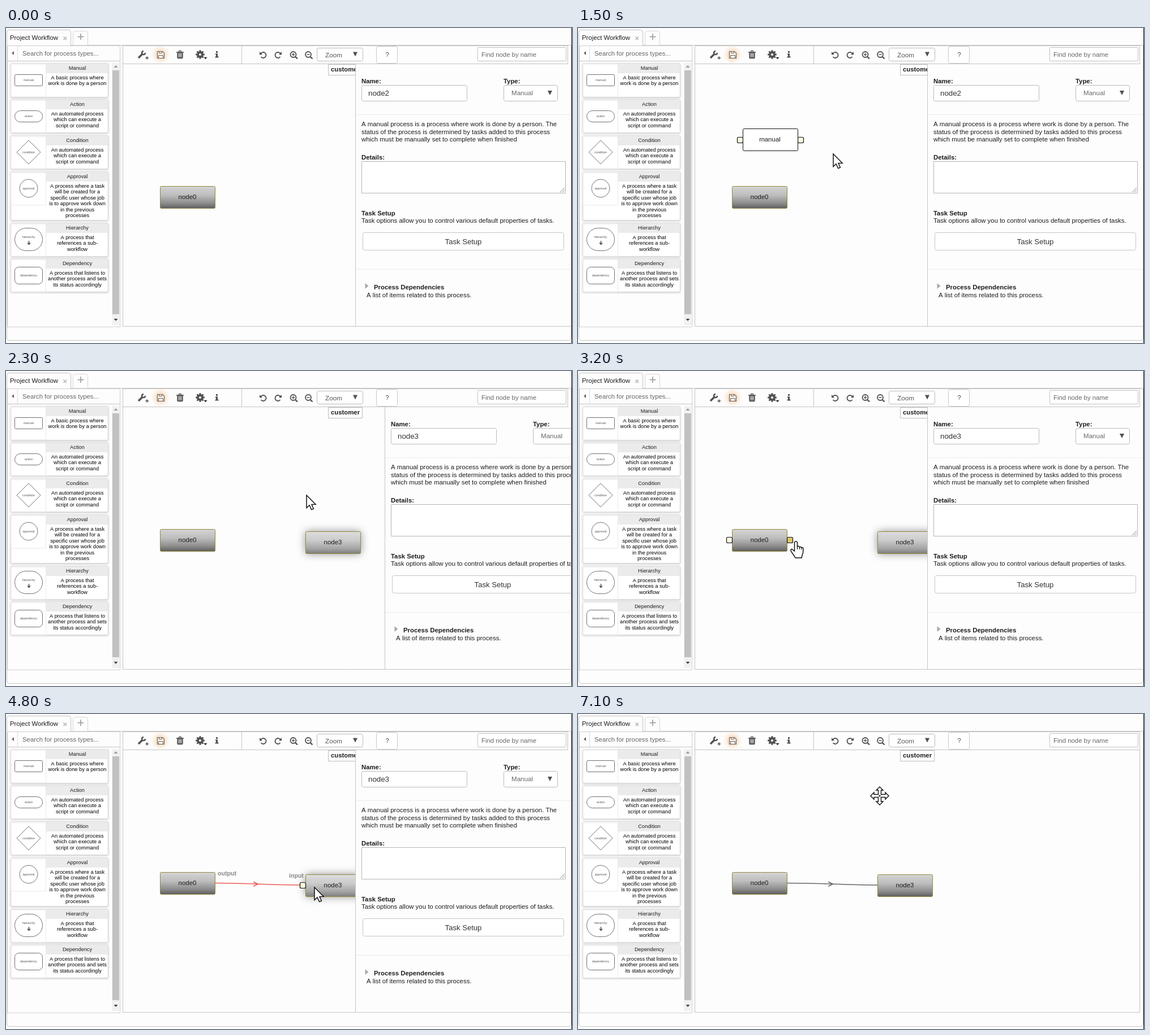
An HTML page with a canvas for the animation above (7200 ms loop, 1000 by 558 pixels).

```html
<!DOCTYPE html>
<html lang="en">
<head>
<meta charset="utf-8">
<title>Workflow editor</title>
<style>
html, body { margin: 0; width: 100%; height: 100%; overflow: hidden; background: #fdfdfd; }
canvas { display: block; width: 1000px; height: 558px; }
</style>
</head>
<body>
<canvas id="stage" width="1000" height="558"></canvas>
<script>
const ctx = document.getElementById('stage').getContext('2d');
const LOOP = 7200, STEP = 100, SLIDE = 400;
const SLIDE_IN = 1996, SLIDE_OUT = 5328;
const BG = '#fdfdfd', LINE = '#c4c4c4', INK = '#1c1c1c', ICON = '#505050';
const OPEN_X = 618, TRAVEL = 382;

function text(str, x, y, size = 11.4, { bold = false, color = INK, align = 'left' } = {}) {
  ctx.font = `${bold ? 'bold ' : ''}${size}px "Liberation Sans", Arial, sans-serif`;
  ctx.textAlign = align;
  ctx.fillStyle = color;
  ctx.fillText(str, x, Math.round(y + size * 0.36));
}

function box(x, y, w, h, r = 0, stroke = LINE, fill = null, width = 1) {
  ctx.beginPath();
  ctx.roundRect(x + 0.5, y + 0.5, w, h, r);
  if (fill) { ctx.fillStyle = fill; ctx.fill(); }
  if (stroke) { ctx.strokeStyle = stroke; ctx.lineWidth = width; ctx.stroke(); }
}

function rect(x, y, w, h, color) {
  ctx.fillStyle = color;
  ctx.fillRect(x, y, w, h);
}

function trace(points, close) {
  ctx.beginPath();
  points.forEach(([x, y]) => ctx.lineTo(x, y));
  if (close) ctx.closePath();
}

function poly(points, fill, stroke, width = 1) {
  trace(points, true);
  if (fill) { ctx.fillStyle = fill; ctx.fill(); }
  if (stroke) { ctx.strokeStyle = stroke; ctx.lineWidth = width; ctx.stroke(); }
}

function line(points, color = ICON, width = 1) {
  trace(points, false);
  ctx.strokeStyle = color;
  ctx.lineWidth = width;
  ctx.stroke();
}

function ring(x, y, r, color = ICON, width = 1, from = 0, to = Math.PI * 2) {
  ctx.beginPath();
  ctx.arc(x, y, r, from, to);
  ctx.strokeStyle = color;
  ctx.lineWidth = width;
  ctx.stroke();
}

function at(x, y, draw, flip = 1) {
  ctx.save();
  ctx.translate(x, y);
  ctx.scale(flip, 1);
  draw();
  ctx.restore();
}

const caret = (x, y, w, h, color = ICON) =>
  poly([[x - w, y - h], [x + w, y - h], [x, y + h]], color);

// Sidebar
const tiles = [
  { name: 'Manual', y: 62, h: 60, lines: ['A basic process where', 'work is done by a person'] },
  { name: 'Action', y: 126, h: 59, lines: ['An automated process', 'which can execute a', 'script or command'] },
  { name: 'Condition', y: 190, h: 59, lines: ['An automated process', 'which can execute a', 'script or command'] },
  { name: 'Approval', y: 254, h: 86, lines: ['A process where a task', 'will be created for a', 'specific user whose job', 'is to approve work down', 'in the previous', 'processes'] },
  { name: 'Hierarchy', y: 345, h: 59, lines: ['A process that', 'references a sub-', 'workflow'] },
  { name: 'Dependency', y: 408, h: 59, lines: ['A process that listens to', 'another process and sets', 'its status accordingly'] }
];

const shapes = {
  Manual: y => box(15, y - 10, 49, 20, 2, '#707070', '#fff'),
  Action: y => box(15, y - 10, 49, 20, 10, '#707070', '#fff'),
  Condition: y => poly([[40, y - 21], [61, y], [40, y + 21], [19, y]], '#fff', '#777'),
  Approval: y => ring(40, y, 16, '#777'),
  Hierarchy: y => {
    box(15, y - 21, 49, 40, 20, '#707070', '#fff');
    line([[40.5, y + 2], [40.5, y + 8]], '#444', 1.3);
    line([[38, y + 5.5], [40.5, y + 8.5], [43, y + 5.5]], '#444', 1.3);
  },
  Dependency: y => box(15, y - 15, 49, 30, 7, '#707070', '#fff')
};

function tile({ name, y, h, lines }) {
  ctx.save();
  ctx.shadowColor = 'rgba(0,0,0,.18)';
  ctx.shadowBlur = 3;
  ctx.shadowOffsetY = 1;
  box(8, y, 172, h, 2, '#dedede', '#fff');
  ctx.restore();
  rect(71, y + 1, 109, 17, '#ebebeb');
  box(8, y + 0.5, 62, 59, 0, '#e9e9e9');
  const mid = y + 30;
  shapes[name](mid);
  text(name.toLowerCase(), 40, name === 'Hierarchy' ? mid - 5 : mid, 5.5, { align: 'center', color: '#555' });
  text(name, 126, y + 8.6, 9.3, { align: 'center' });
  lines.forEach((s, i) => text(s, 126, y + 25.7 + i * 10.4, 9.25, { align: 'center', color: '#000' }));
}

function sidebar() {
  box(2, 31, 199, 498, 0, '#d0d0d0');
  line([[20.5, 32], [20.5, 58]], '#dadada');
  line([[2, 58.5], [202, 58.5]], LINE);
  poly([[14, 41], [14, 48], [10, 44.5]], '#666');
  text('Search for process types...', 29, 44.5, 11.35, { color: '#666' });
  rect(187, 62, 13, 464, '#f1f1f1');
  rect(188, 75, 12, 432, '#c1c1c1');
  poly([[190.5, 70], [197.5, 70], [194, 66]], '#999');
  poly([[190.5, 515], [197.5, 515], [194, 519]], '#444');
  tiles.forEach(tile);
}

// Toolbar
function turnArrow(x, flip) {
  at(x, 48, () => {
    ring(0, 0, 5, ICON, 1.8, -2.6, 2.5);
    poly([[-6.5, -6], [-6.5, -0.8], [-1.5, -0.8]], ICON);
  }, flip);
}

function lens(x, plus) {
  at(x, 47, () => {
    ring(0, 0, 5, ICON, 1.8);
    line([[3.6, 3.8], [7.5, 7.5]], ICON, 2.4);
    line([[-2.6, 0], [2.6, 0]], ICON, 1.4);
    if (plus) line([[0, -2.6], [0, 2.6]], ICON, 1.4);
  });
}

function toolbar() {
  line([[207, 63.5], [992, 63.5]], LINE);
  line([[416.5, 32], [416.5, 63]], LINE);

  at(240, 47, () => {
    line([[-6, 6], [1, -1]], ICON, 3.4);
    ring(3, -3, 3, ICON, 2.6, 0, 4.7);
    line([[6.5, 6], [12, 6]], ICON, 1.5);
    line([[9.2, 3.2], [9.2, 8.8]], ICON, 1.5);
  });

  const glow = ctx.createRadialGradient(273, 47, 8, 273, 47, 17);
  glow.addColorStop(0, '#fbe3cc');
  glow.addColorStop(1, 'rgba(253,236,220,0)');
  rect(256, 32, 34, 31, glow);
  poly([[267.5, 41.5], [276.5, 41.5], [279.5, 44.5], [279.5, 53.5], [267.5, 53.5]], '#fdf3e8', '#6a625c', 1.2);
  box(270, 41, 5, 3, 0, '#6a625c');
  box(269, 48, 8, 5, 0, '#6a625c');

  box(302.5, 43, 9, 10, 1, ICON, '#777', 1.4);
  line([[301, 43], [314, 43]], ICON, 1.6);
  line([[305, 42], [306, 40.5], [309, 40.5], [310, 42]], ICON, 1.3);
  [305.5, 307.5, 309.5].forEach(x => line([[x, 45], [x, 51]], '#eee', 0.8));

  ring(343, 47, 4, ICON, 3.8);
  for (let i = 0; i < 8; i++) {
    const a = i * Math.PI / 4, c = Math.cos(a), s = Math.sin(a);
    line([[343 + c * 5, 47 + s * 5], [343 + c * 7.8, 47 + s * 7.8]], ICON, 3);
  }
  caret(352.5, 53.5, 3, 1.8, '#222');

  rect(371, 41, 3, 3, ICON);
  rect(370, 45.5, 4, 2, ICON);
  rect(371, 45.5, 3, 6, ICON);
  rect(369.5, 50.5, 6, 2, ICON);

  turnArrow(454.5, 1);
  turnArrow(480.5, -1);
  lens(507.5, true);
  lens(534, false);

  box(549, 35, 81, 23, 3, '#bbb', '#fff');
  text('Zoom', 564, 47.5, 11.7, { color: '#555' });
  caret(617, 46.5, 4, 4);
  box(654, 32, 37, 30, 3, '#c8c8c8', '#fff');
  text('?', 673.5, 47, 11.5, { align: 'center', color: '#444' });
  box(833, 34, 156, 24, 1, '#c0c0c0', '#fff');
  text('Find node by name', 840, 46.5, 11.35, { color: '#666' });
}

function shell() {
  rect(0, 0, 1000, 558, BG);
  box(1, 30, 997, 523, [0, 0, 5, 5], LINE);
  rect(999, 0, 1, 558, '#111');
  box(118, 5, 26, 25, [4, 4, 0, 0], '#d6d6d6', BG);
  line([[126.5, 15.5], [137.5, 15.5]], '#999', 1.6);
  line([[132, 10], [132, 21]], '#999', 1.6);
  box(1, 3, 113, 28, [4, 4, 0, 0], LINE, BG);
  rect(2, 30, 112, 2, BG);
  text('Project Workflow', 7, 17, 11.35);
  line([[101.5, 15.5], [107, 21]], '#c3b4b4', 1.7);
  line([[107, 15.5], [101.5, 21]], '#c3b4b4', 1.7);
  sidebar();
  box(206, 31, 786, 497, 0, LINE);
  toolbar();
  box(569, 64, 60, 19, 0, '#bbb', '#fff');
  text('customer', 574, 73, 11.35, { bold: true });
}

// Graph
function port(x, y, hot) {
  box(x, y, 10, 10, 2, '#111', hot ? '#e9d67a' : '#fffbe0', 1.2);
  if (hot) for (let i = 2; i < 9; i += 3) for (let j = 2; j < 9; j += 3) rect(x + i, y + j, 1, 1, '#6b5a14');
}

function node(label, x, y, selected) {
  const fill = ctx.createLinearGradient(0, y, 0, y + 40);
  const tones = selected ? ['#dedede', '#cbcbcb', '#a6a6a6', '#7c7c7c'] : ['#d6d6d6', '#bdbdbd', '#8e8e8e', '#5c5c5c'];
  tones.forEach((tone, i) => fill.addColorStop([0, 0.4, 0.75, 1][i], tone));
  ctx.save();
  if (selected) { ctx.shadowColor = 'rgba(0,0,0,.45)'; ctx.shadowBlur = 15; }
  box(x, y, 97, 39, 2, null, fill);
  ctx.restore();
  box(x, y, 97, 39, 2, '#93883c');
  text(label, x + 48.5, y + 19, 11.5, { align: 'center' });
}

function rawNode(cx, cy) {
  const x = Math.round(cx - 49), y = Math.round(cy - 19);
  if (x > 207) {
    port(x - 10, y + 15);
    port(x + 97, y + 15);
  }
  box(x, y, 97, 39, 2, '#111', '#fff');
  text('manual', cx - 1, cy, 11.5, { align: 'center' });
}

function link(x, y, color) {
  const dx = x - 370;
  ctx.beginPath();
  ctx.moveTo(370, 299.5);
  ctx.bezierCurveTo(370 + dx * 0.4, 299.8, x - dx * 0.4, y - 0.5, x, y);
  ctx.strokeStyle = color;
  ctx.lineWidth = 1.6;
  ctx.stroke();
  const tip = 370 + dx * 0.505, my = (299.5 + y) / 2;
  if (dx > 30) line([[tip - 8, my - 4], [tip, my], [tip - 8, my + 4]], color, 1.6);
}

// Properties
function panel(x, name) {
  if (x >= 998) return;
  ctx.save();
  ctx.beginPath();
  ctx.rect(0, 64, 998, 465);
  ctx.clip();
  rect(x, 64, 400, 464, BG);
  line([[x, 528.5], [998, 528.5]], LINE);
  ctx.translate(x, 0);
  line([[-0.5, 64], [-0.5, 528]], LINE);
  const bold = { bold: true };
  text('Name:', 10, 94, 11.35, bold);
  box(10, 101, 186, 28, 3, '#bbb', '#fff');
  text(name, 22, 115, 13.3, { color: '#333' });
  text('Type:', 261, 94, 11.35, bold);
  box(261, 101, 95, 28, 3, '#bbb', '#fff');
  text('Manual', 275, 115, 11.6, { color: '#666' });
  caret(343, 115, 4, 4);
  line([[0, 153.5], [380, 153.5]], '#ececec');
  ['A manual process is a process where work is done by a person. The',
    'status of the process is determined by tasks added to this process',
    'which must be manually set to complete when finished'
  ].forEach((s, i) => text(s, 10, 170 + i * 13.4));
  text('Details:', 10, 229.3, 11.35, bold);
  box(10, 236, 360, 56, 0, '#b5b5b5', '#fff');
  line([[361, 291], [369, 283]], '#888');
  line([[365, 291], [369, 287]], '#888');
  text('Task Setup', 10, 328, 11.35, bold);
  text('Task options allow you to control various default properties of tasks.', 10, 341.3);
  box(12, 362, 355, 31, 3, '#c4c4c4', '#fff');
  text('Task Setup', 190, 378, 13.1, { align: 'center', color: '#333' });
  line([[0, 427.5], [380, 427.5]], '#ececec');
  poly([[16.5, 452], [16.5, 462], [22.5, 457]], '#aaa');
  text('Process Dependencies', 32, 459.4, 11.35, bold);
  text('A list of items related to this process.', 19, 473);
  ctx.restore();
}

// Pointer
const track = [
  [400, 300, 215], [800, 42, 94], [1130, 42, 94], [1400, 340, 197],
  [1500, 451, 223], [1800, 578, 303], [1950, 578, 303], [2300, 531, 220],
  [2500, 531, 220], [3100, 385, 301], [3600, 385, 301], [4550, 545, 307],
  [4850, 545, 307], [5200, 517, 129]
];

function along(t) {
  const i = track.findIndex(k => k[0] > t);
  if (i < 0) return track[track.length - 1].slice(1);
  if (i === 0) return track[0].slice(1);
  const [a, b] = [track[i - 1], track[i]];
  const p = (t - a[0]) / (b[0] - a[0]);
  return [a[1] + (b[1] - a[1]) * p, a[2] + (b[2] - a[2]) * p];
}

const arrow = () => poly([[0, 0], [0, 22.5], [5, 17.8], [8.6, 25.6], [12.4, 24], [9, 16.5], [16, 16.3]], '#fff', '#111', 1.5);

function hand() {
  ctx.beginPath();
  ctx.moveTo(-2.5, 18);
  ctx.lineTo(-2.5, 2.5);
  ctx.quadraticCurveTo(0, -1, 2.5, 2.5);
  ctx.lineTo(2.5, 10);
  ctx.quadraticCurveTo(5, 8, 6.5, 11);
  ctx.quadraticCurveTo(9, 9.5, 10, 12);
  ctx.quadraticCurveTo(13, 11, 13, 14);
  ctx.lineTo(12.5, 21);
  ctx.quadraticCurveTo(11, 25, 10, 30);
  ctx.lineTo(-1, 30);
  ctx.quadraticCurveTo(-3, 26, -7.5, 20);
  ctx.quadraticCurveTo(-11, 14.5, -7, 14.5);
  ctx.closePath();
  ctx.fillStyle = '#fff';
  ctx.fill();
  ctx.strokeStyle = '#111';
  ctx.lineWidth = 1.5;
  ctx.stroke();
  line([[2.5, 10], [2.5, 15]], '#111', 1.2);
  line([[6.5, 11], [6.5, 15]], '#111', 1.2);
  line([[10, 12], [10, 15.5]], '#111', 1.2);
}

function mover() {
  const arm = [[-2.5, -2.5], [-2.5, -10], [-6, -10], [0, -16], [6, -10], [2.5, -10]];
  const points = [];
  for (let q = 0; q < 4; q++) {
    const c = [1, 0, -1, 0][q], s = [0, 1, 0, -1][q];
    arm.forEach(([x, y]) => points.push([x * c - y * s, x * s + y * c]));
  }
  poly(points, '#fff', '#111', 1.4);
  line([[-2, 0], [2, 0]], '#111');
  line([[0, -2], [0, 2]], '#111');
}

function pointer(t) {
  if (t < 400) return;
  const [x, y] = along(t);
  if (t >= 6000) at(x + 16, y + 16, mover);
  else at(x, y, t >= 3000 && t < 3600 ? hand : arrow);
}

const swing = p => 0.5 - Math.cos(Math.PI * Math.min(1, Math.max(0, p))) / 2;

function panelX(t) {
  if (t < SLIDE_IN) return OPEN_X;
  const hidden = 1 - swing((t - SLIDE_IN) / SLIDE) + swing((t - SLIDE_OUT) / SLIDE);
  return Math.round(OPEN_X + TRAVEL * hidden);
}

function draw(t) {
  shell();
  const placed = t >= 2000, linked = t >= 4600, active = t < 5300;

  if (t >= 3600) {
    const p = Math.min(1, (t - 3600) / 950);
    if (active) link(380 + 139 * p, 300 + 3 * p, '#ee5c55');
    else link(529, 303, '#666');
  }
  node('node0', 272, 280);
  if (placed) node('node3', 529, 284, active);
  if (t >= 1130 && !placed) rawNode(...along(t - 100));
  if (t >= 2900 && t < 3900) {
    port(262, 294);
    port(369, 294, t >= 3000);
  }
  if (t >= 3600 && active) text('output', 374, 282, 10.6, { bold: true, color: '#888' });
  if (t >= 4300 && t < 5000) port(519, 298);
  if (linked && active) text('input', 500, 286, 10.6, { bold: true, color: '#888' });

  panel(panelX(t), placed ? 'node3' : 'node2');
  pointer(t);
}

const start = performance.now();
function frame() {
  const t = (performance.now() - start) % LOOP;
  draw(Math.floor(t / STEP) * STEP);
  requestAnimationFrame(frame);
}
frame();
</script>
</body>
</html>
```
